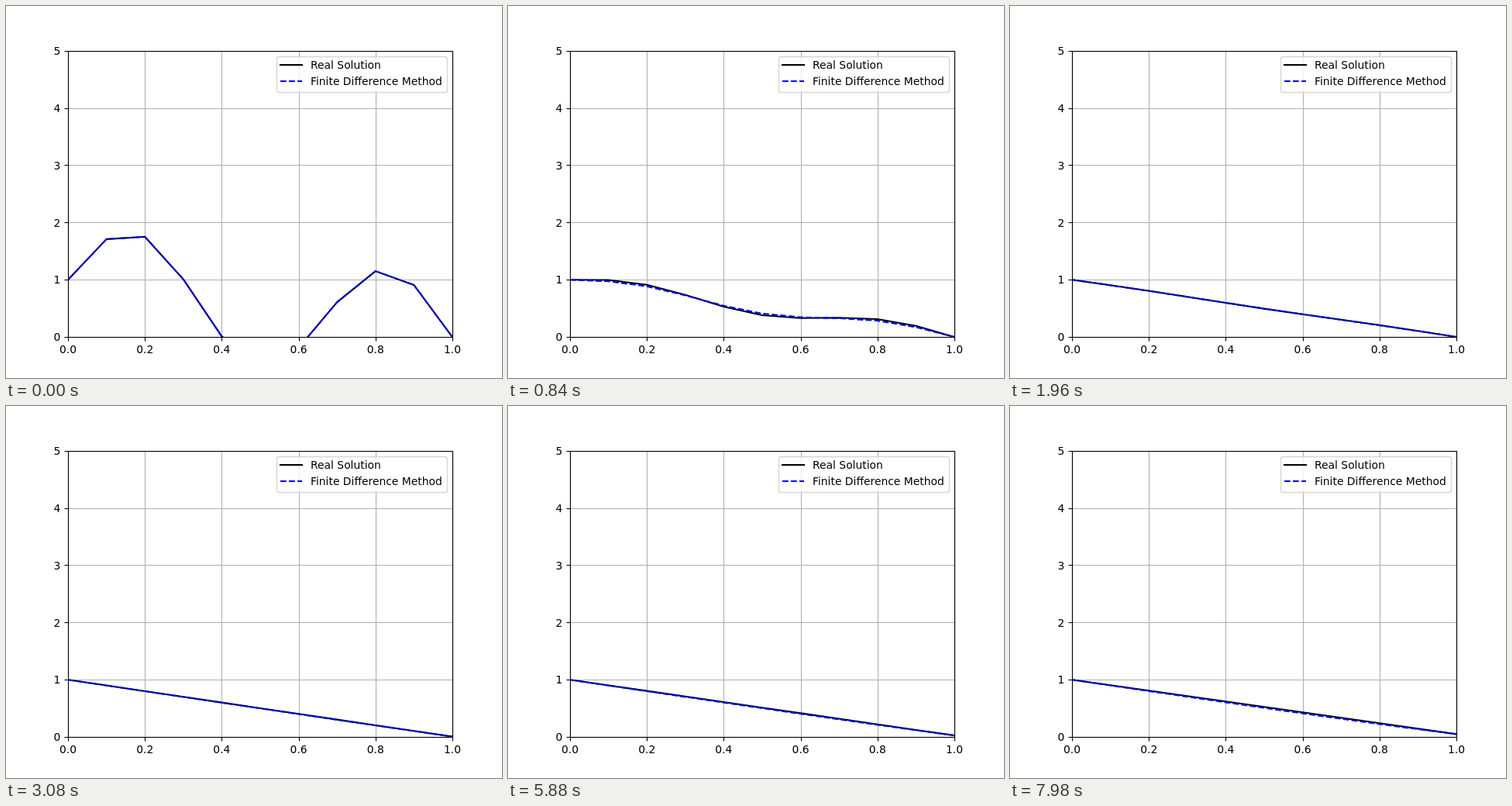
An HTML page with a canvas for the animation above (8 s loop, 640 px wide and 480 px high).

```html
<!DOCTYPE html>
<html lang="en">
<head>
<meta charset="utf-8">
<title>Heat equation</title>
<style>
html, body { margin: 0; width: 640px; height: 480px; overflow: hidden; background: #fff; }
canvas { display: block; }
</style>
</head>
<body>
<canvas id="plot" width="640" height="480"></canvas>
<script>
const ctx = document.getElementById('plot').getContext('2d');
const LOOP = 8000, STEP = 140;
const N = 10, DX = 1 / N, DT = 0.004, R = DT / (DX * DX);
const EM = 100 / 7.2;             // 10 pt at 100 dpi
const LINE = 0.15 * EM, THIN = 0.08 * EM;
const DASH = [3.7 * LINE, 1.6 * LINE];

const px = x => 80 + 496 * x;
const py = y => 427.2 - 73.92 * y;
const snap = v => Math.floor(v + 0.5) + 0.5;
const nodes = f => Array.from({ length: N + 1 }, (_, i) => f(i * DX));

// u_t = u_xx with u(0) = 1 and u(1) = t^2
const real = t => nodes(x =>
  1 - x + x * t * t + Math.exp(-9 * Math.PI ** 2 * t) * Math.sin(3 * Math.PI * x));

const schemes = [real(0)];
for (let n = 1; n <= LOOP / STEP; n++) {
  const u = schemes[n - 1];
  schemes.push(u.map((v, i) => {
    if (i === 0) return 1;
    if (i === N) return (n * DT) ** 2;
    return v + R * (u[i - 1] - 2 * v + u[i + 1]);
  }));
}

function stroke(points, color, width, cap = 'butt', dash = []) {
  ctx.beginPath();
  points.forEach(([x, y]) => ctx.lineTo(x, y));
  ctx.strokeStyle = color;
  ctx.lineWidth = width;
  ctx.lineCap = cap;
  ctx.lineJoin = 'round';
  ctx.setLineDash(dash);
  ctx.stroke();
  ctx.setLineDash([]);
}

function text(str, x, y, align) {
  ctx.fillStyle = '#000';
  ctx.textAlign = align;
  ctx.fillText(str, x, y);
}

function drawAxes() {
  for (let i = 0; i <= 5; i++) {
    const x = snap(px(i / 5)), y = snap(py(i));
    stroke([[x, 58], [x, 428]], '#b0b0b0', THIN);
    stroke([[80, y], [577, y]], '#b0b0b0', THIN);
  }
  for (let i = 0; i <= 5; i++) {
    const x = snap(px(i / 5)), y = snap(py(i));
    stroke([[x, 427.5], [x, 432.5]], '#000', THIN);
    stroke([[75.5, y], [80.5, y]], '#000', THIN);
    text((i / 5).toFixed(1), px(i / 5), 448, 'center');
    text(String(i), 70.3, Math.round(py(i) + 5.2), 'right');
  }
}

function drawCurve(u, ...style) {
  ctx.save();
  ctx.beginPath();
  ctx.rect(80, 58, 496, 369);
  ctx.clip();
  stroke(u.map((v, i) => [px(i * DX), py(v)]), ...style);
  ctx.restore();
}

function drawLegend() {
  ctx.beginPath();
  ctx.roundRect(349.5, 65.5, 220, 46, 2.8);
  ctx.fillStyle = 'rgba(255,255,255,0.8)';
  ctx.fill();
  ctx.strokeStyle = 'rgba(204,204,204,0.8)';
  ctx.lineWidth = 0.1 * EM;
  ctx.stroke();
  stroke([[354, 76], [382, 76]], '#000', LINE, 'square');
  stroke([[354, 97], [382, 97]], '#00f', LINE, 'butt', DASH);
  text('Real Solution', 393, 81, 'left');
  text('Finite Difference Method', 393, 102, 'left');
}

function draw(ms) {
  const n = Math.floor((ms % LOOP) / STEP);
  ctx.fillStyle = '#fff';
  ctx.fillRect(0, 0, 640, 480);
  ctx.font = `${EM}px "DejaVu Sans", sans-serif`;
  drawAxes();
  drawCurve(real(n * DT), '#000', LINE, 'square');
  drawCurve(schemes[n], '#00f', LINE, 'butt', DASH);
  ctx.strokeStyle = '#000';
  ctx.lineWidth = THIN;
  ctx.lineJoin = 'miter';
  ctx.strokeRect(80.5, 58.5, 496, 369);
  drawLegend();
}

let start = null;
function tick(now) {
  if (start === null) start = now;
  draw(now - start);
  requestAnimationFrame(tick);
}
draw(0);
requestAnimationFrame(tick);
</script>
</body>
</html>
```
